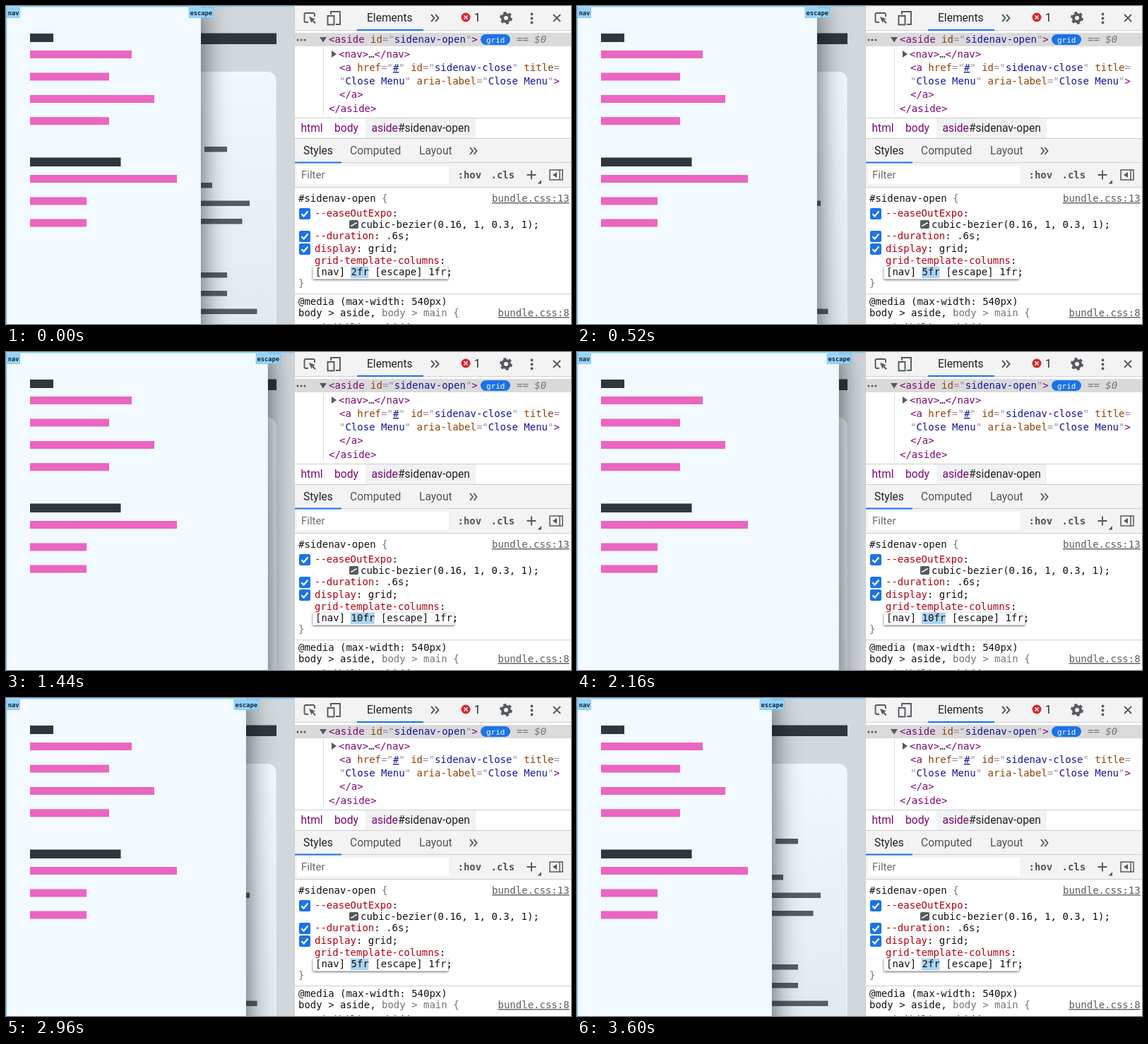
Recreate the animation shown at these times as an HTML page. Size 800 by 450 pixels, loop 3.68 s.

```html
<!DOCTYPE html>
<html lang="en">
<head>
<meta charset="utf-8">
<title>Grid columns in the styles panel</title>
<style>
  html, body { margin: 0; width: 100%; height: 100%; overflow: hidden; background: #fff; }
  svg { display: block; width: 800px; height: 450px; }
  text { white-space: pre; font: 14px "DejaVu Sans Mono", monospace; fill: #111; }
  .ui text { font: 15.6px Roboto, sans-serif; fill: #50545a; }
  .ui .on { fill: #222; }
  .ui .crumb { fill: #7d0873; }
  .tag { fill: #7d0873; }
  .attr { fill: #8f4200; }
  .val { fill: #14149c; }
  .eq { fill: #a08a9e; }
  .prop { fill: #b00010; }
  .dim { fill: #757575; }
  .link { fill: #5c5c5c; text-decoration: underline; }
  .bold { font-weight: bold; fill: #505459; }
  .label rect { fill: #96d4fb; stroke: #74bdec; stroke-width: .7; }
  .label text { font-size: 8.7px; font-weight: bold; fill: #17222b; }
  .icon { fill: none; stroke: #555a5f; stroke-width: 1.9; }
  .solid { fill: #555a5f; stroke: none; }
  #shadow { filter: blur(20px); }
</style>
</head>
<body>
<svg viewBox="0 0 800 450">
  <defs>
    <linearGradient id="card" x2="0" y2="1">
      <stop stop-color="#f1f8fc"/><stop offset="1" stop-color="#e0e8ee"/>
    </linearGradient>
    <clipPath id="page"><path d="M0 0H408V450H0z"/></clipPath>
    <g id="check">
      <rect width="16" height="16" rx="2.5" fill="#1a73e8"/>
      <path d="M3.5 8.3l3 3.2 6-7" fill="none" stroke="#fff" stroke-width="2.2"/>
    </g>
  </defs>

  <g clip-path="url(#page)">
    <path d="M0 0H408V450H0z" fill="#d1d7db"/>
    <path d="M200 38.5H383V54H200z" fill="#30373a"/>
    <rect x="100" y="93.5" width="282" height="400" rx="11" fill="url(#card)" stroke="#f4f9fc"/>
    <path fill="#565c60" d="M281 199h32v7.5h-32zM200 250h92v7.5h-92zM200 275.5h145v7.5h-145zM200 301h134.5v7.5h-134.5zM200 377h113v7.5h-113zM200 403h113v7.5h-113zM200 428.5h155.5v7.5h-155.5z"/>
    <rect id="shadow" y="0" height="560" fill="#0d1318" opacity=".72"/>
    <rect id="sidebar" height="450" fill="#f2f9ff"/>
    <path fill="#30373a" d="M34 39h33v12h-33zM34 214.5h128.5v12.5h-128.5z"/>
    <path fill="#ea66c0" d="M34 63h144v11h-144zM34 94.5h112v11h-112zM34 126h176v11h-176zM34 157.3h112v11h-112zM34 239h208v11h-208zM34 270.5h80v11h-80zM34 301.5h80v11h-80z"/>
    <path d="M.7 450V.7H408" fill="none" stroke="#86d0fa" stroke-width="1.4"/>
    <path id="line" d="M0 0V450" stroke="#a5dcfb" stroke-dasharray="2 2" opacity=".5"/>
    <g class="label"><rect x="1" y="2.5" width="18.5" height="14"/><text x="2.7" y="12.7">nav</text></g>
    <g class="label" id="escape"><rect x="-17" y="2.5" width="34.5" height="14"/><text x="-15.5" y="12.7">escape</text></g>
  </g>

  <path d="M408 0H800V450H408z" fill="#fff"/>
  <path d="M409 0H800V35H409zM409 188H800V256H409z" fill="#f3f3f3"/>
  <path d="M409 38H800V57H409z" fill="#dadada"/>
  <path d="M509 159H665V187H509z" fill="#f1f2f4"/>
  <path d="M412 226H627V252H412z" fill="#fff"/>
  <path d="M408.5 0V450M409 34.5H800M409 158.5H800M409 187.5H800M409 221.5H800M409 256.5H800M409 407.5H800" stroke="#cdcdcd"/>
  <path d="M449.5 58V154" stroke="#dcdcdc"/>
  <path d="M497 34H591M409 221.5H475" stroke="#1a73e8" stroke-width="2"/>

  <g class="ui">
    <text class="on" x="511" y="22">Elements</text>
    <text class="on" x="663" y="22">1</text>
    <text class="on" x="421" y="210">Styles</text>
    <text x="487" y="210">Computed</text>
    <text x="585" y="210">Layout</text>
    <text x="418" y="244" style="font-size:15px;fill:#6c6c6c">Filter</text>
    <text class="crumb" x="417.5" y="178">html</text>
    <text class="crumb" x="465" y="178">body</text>
    <text class="on" x="517.5" y="178"><tspan class="tag">aside</tspan>#sidenav-open</text>
  </g>

  <g class="icon">
    <path d="M428 23h-3.5a2 2 0 0 1-2-2v-9a2 2 0 0 1 2-2h10.5a2 2 0 0 1 2 2v3M433 19l5 5.5"/>
    <path d="M460 12V8h13v18h-6M455.5 14h9v12.5h-9z"/>
    <path d="M602 12l4.5 5-4.5 5M608 12l4.5 5-4.5 5M657 200l4 5-4 5M662.5 200l4 5-4 5"/>
    <circle cx="708" cy="17" r="5" stroke-width="4"/>
    <circle cx="708" cy="17" r="7.5" stroke-width="3" stroke-dasharray="3.9 3.954"/>
    <path d="M775 12l10 10m0-10l-10 10M737.5 239h13M744 232.5v13"/>
    <path d="M770 232h18v14h-18zM784 232v14" stroke-width="1.5"/>
    <g class="solid">
      <path d="M429 15l9 3.5-4 1.5-1.5 4zM780 235v8l-6-4zM758 246v5.5h-5.5zM444 44h10l-5 7.5zM461 63v10l7-5z"/>
      <circle cx="744.5" cy="11.5" r="1.9"/><circle cx="744.5" cy="17.5" r="1.9"/><circle cx="744.5" cy="23.5" r="1.9"/>
      <circle cx="413" cy="48" r="1.5"/><circle cx="418" cy="48" r="1.5"/><circle cx="423" cy="48" r="1.5"/>
    </g>
  </g>
  <circle cx="651" cy="16" r="6.5" fill="#d9262c"/>
  <path d="M648.5 13.5l5 5m0-5l-5 5" stroke="#fff" stroke-width="1.5"/>

  <text class="tag" x="457" y="52">&lt;aside <tspan class="attr">id</tspan><tspan class="eq">="</tspan><tspan class="val">sidenav-open</tspan><tspan class="eq">"</tspan>&gt;</text>
  <rect x="672" y="40" width="42" height="15" rx="7.5" fill="#1a73e8"/>
  <text x="680" y="51.5" style="font-size:11px;fill:#fff">grid</text>
  <text class="dim" x="723" y="52" style="font-style:italic">== $0</text>
  <text class="tag" x="471" y="73">&lt;nav&gt;<tspan style="fill:#333">…</tspan>&lt;/nav&gt;</text>
  <text class="tag" x="472" y="92">&lt;a <tspan class="attr">href</tspan><tspan class="eq">="</tspan><tspan class="val" text-decoration="underline">#</tspan><tspan class="eq">"</tspan> <tspan class="attr">id</tspan><tspan class="eq">="</tspan><tspan class="val">sidenav-close</tspan><tspan class="eq">"</tspan> <tspan class="attr">title</tspan><tspan class="eq">=</tspan></text>
  <text class="tag" x="472" y="110.5"><tspan class="eq">"</tspan><tspan class="val">Close Menu</tspan><tspan class="eq">"</tspan> <tspan class="attr">aria-label</tspan><tspan class="eq">="</tspan><tspan class="val">Close Menu</tspan><tspan class="eq">"</tspan>&gt;</text>
  <text class="tag" x="472" y="129.5">&lt;/a&gt;</text>
  <text class="tag" x="457" y="149.5">&lt;/aside&gt;</text>

  <text class="bold" x="639.5" y="244">:hov</text>
  <text class="bold" x="686.5" y="244">.cls</text>

  <text x="414" y="277">#sidenav-open <tspan class="dim">{</tspan></text>
  <text class="link" x="688" y="277">bundle.css:13</text>
  <use href="#check" x="415" y="286"/>
  <use href="#check" x="415" y="318"/>
  <use href="#check" x="415" y="336"/>
  <text x="437" y="297.5"><tspan class="prop">--easeOutExpo</tspan>:</text>
  <rect x="486" y="303" width="13" height="12" rx="2" fill="#555a5f"/>
  <path d="M488 311c5 0 4-4 9-4" fill="none" stroke="#fff" stroke-width="1.6"/>
  <text x="502" y="313.5">cubic-bezier(0.16, 1, 0.3, 1);</text>
  <text x="437" y="329.5"><tspan class="prop">--duration</tspan>: .6s;</text>
  <text x="437" y="347.5"><tspan class="prop">display</tspan>: grid;</text>
  <text x="437" y="365"><tspan class="prop">grid-template-columns</tspan>:</text>
  <rect id="editor" x="434.5" y="369" height="17.5" fill="#fff" style="filter:drop-shadow(0 1px 1.5px #000a)"/>
  <rect id="selection" x="488" y="369" height="16" fill="#abd3f5"/>
  <text id="columns" x="438" y="381"></text>
  <text class="dim" x="414" y="397">}</text>
  <text x="414" y="423">@media (max-width: 540px)</text>
  <text x="414" y="439">body &gt; aside, <tspan class="dim">body &gt; main {</tspan></text>
  <text class="link" x="696.5" y="439">bundle.css:8</text>
  <text x="437" y="460"><tspan class="prop">visibility</tspan>: hidden;</text>
</svg>
<script>
  const LOOP = 3680, STEP = 160, PAGE = 408, MIN_NAV = 276, CHAR = 8.43;
  const el = id => document.getElementById(id);

  // The value is nudged from 2fr up to 10fr and back, one key press per step.
  function fractionAt(t) {
    const up = 2 + Math.floor((t + 10) / STEP);
    const down = 10 - Math.floor((t - 2040) / STEP);
    return Math.max(2, Math.min(10, up, down));
  }

  let shown;
  function draw(now) {
    const n = fractionAt(now % LOOP);
    if (n !== shown) {
      shown = n;
      const edge = Math.max(MIN_NAV, PAGE * n / (n + 1));
      const digits = String(n).length;
      el('sidebar').setAttribute('width', edge);
      el('shadow').setAttribute('width', edge);
      el('line').setAttribute('transform', `translate(${edge - .5})`);
      el('escape').setAttribute('transform', `translate(${Math.round(edge - .4)})`);
      el('columns').textContent = `[nav] ${n}fr [escape] 1fr;`;
      el('selection').setAttribute('width', (digits + 2) * CHAR);
      el('editor').setAttribute('width', 183 + digits * CHAR);
    }
    requestAnimationFrame(draw);
  }
  draw(performance.now());
</script>
</body>
</html>
```
